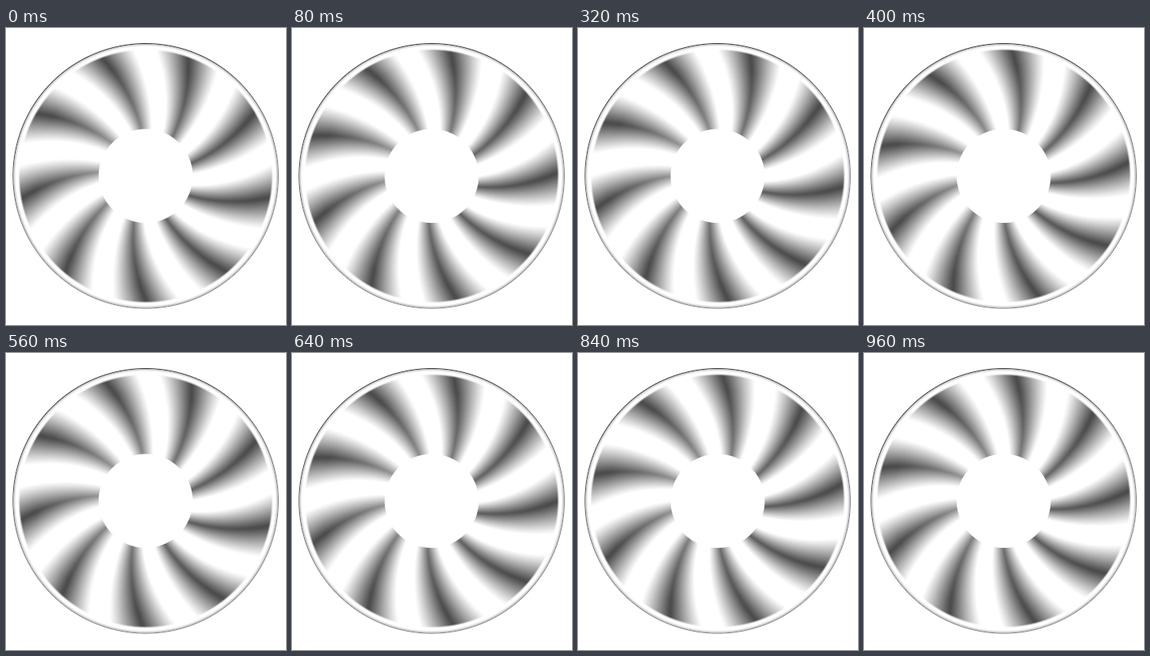
Recreate the animation shown at these times as an HTML page with a canvas. Size 350 px wide and 372 px high, loop 1 s.

```html
<!DOCTYPE html>
<html lang="en">
<head>
<meta charset="utf-8">
<title>Spinning fan</title>
<style>
  html, body { margin: 0; width: 100%; height: 100%; overflow: hidden; background: #fff; }
  canvas { display: block; width: 350px; height: 372px; }
</style>
</head>
<body>
<canvas id="fan" width="350" height="372"></canvas>
<script>
const W = 350, H = 372;
const CX = 174.6, CY = 185.3;
const RIM = 166.3, HUB = 58.8, TIP = 159.3;
const BLADES = 9, PITCH = 360 / BLADES;
const STEPS = 25, STEP_MS = 40;

const ctx = document.getElementById("fan").getContext("2d");
const img = ctx.createImageData(W, H);
const clamp = (v, lo = 0, hi = 1) => Math.min(hi, Math.max(lo, v));
const mix = (a, b, k) => a + (b - a) * k;

// Static shade of the bevelled rim, 0 = no darkening
function rimShade(r, dx, dy) {
  const depth = RIM - r;
  if (depth < -0.5 || depth > 6) return 0;
  const lit = clamp((-dy - 0.3 * dx) / RIM + 0.25);
  const line = clamp(depth + 0.5) * clamp(1.5 - depth) * mix(125, 205, lit);
  const bevel = 105 * clamp(1 - depth / 4.5) ** 1.5 * clamp(depth + 0.5);
  return Math.max(line, bevel);
}

// Geometry of every pixel that the blades can reach
const cells = [];
for (let y = 0; y < H; y++) {
  for (let x = 0; x < W; x++) {
    const dx = x + 0.5 - CX, dy = y + 0.5 - CY;
    const r = Math.hypot(dx, dy);
    const i = (y * W + x) * 4;
    img.data.fill(255 - rimShade(r, dx, dy), i, i + 3);
    img.data[i + 3] = 255;

    const mask = clamp(r - HUB + 0.5) * clamp((TIP - r) / 2.5);
    if (!mask) continue;
    const k = (r - HUB) / (TIP - HUB);
    const inner = 138 + 30 * (0.9 * dx + 0.4 * dy) / r;
    cells.push({
      i,
      base: img.data[i],
      // clockwise angle from the top, with the blade's curve straightened
      angle: Math.atan2(dx, -dy) * 180 / Math.PI - mix(34.5, 19.5, k),
      half: mix(13.2, 15.2, k),
      dark: mask * mix(inner, 188, clamp(k * 1.25))
    });
  }
}

function draw(step) {
  const turn = step * 360 / STEPS;
  for (const c of cells) {
    const n = (c.angle - turn) / PITCH;
    const off = Math.abs(n - Math.round(n)) * PITCH;
    const u = clamp(1 - Math.hypot(off, 0.6) / c.half);
    const v = c.base - c.dark * u ** 1.12;
    img.data[c.i] = img.data[c.i + 1] = img.data[c.i + 2] = v;
  }
  ctx.putImageData(img, 0, 0);
}

let shown = -1;
function tick() {
  const step = Math.floor(performance.now() / STEP_MS) % STEPS;
  if (step !== shown) draw(shown = step);
  requestAnimationFrame(tick);
}
tick();
</script>
</body>
</html>
```
